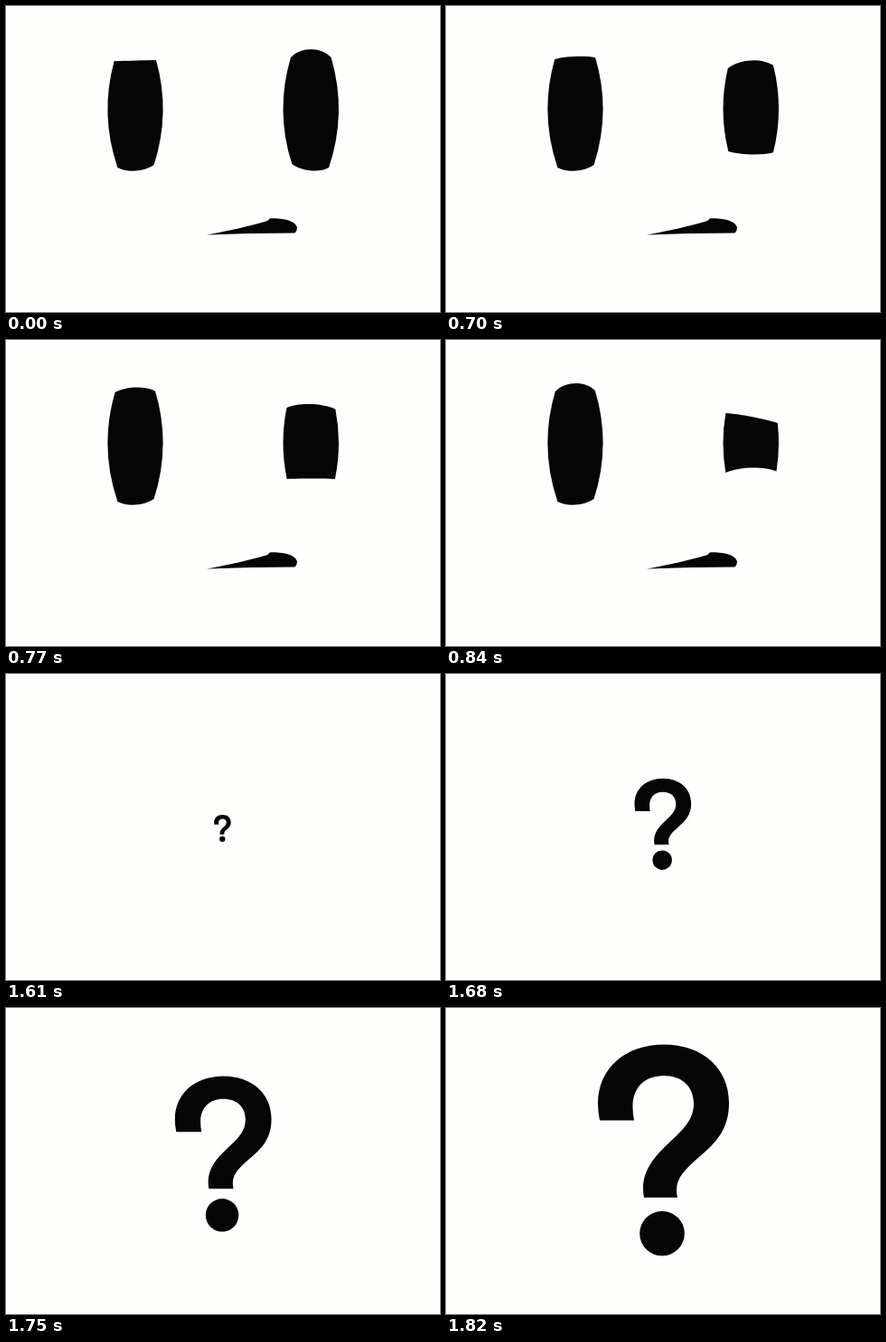
Write an HTML page that moves like this. It is 480 px wide and 339 px high and loops after 4340 ms.

```html
<!DOCTYPE html>
<html lang="en">
<head>
<meta charset="utf-8">
<title>Wink and question</title>
<style>
  html, body { margin: 0; width: 100%; height: 100%; overflow: hidden; background: #fefefc; }
  svg { display: block; width: 100%; height: 100%; }
</style>
</head>
<body>
<svg viewBox="0 0 480 339" fill="#050505">
  <g id="face">
    <path id="left"/>
    <path id="right"/>
    <path d="M222 253.6Q262 246 286 239Q290 238 292 235.2C305 235 320 237 322 245.500Q322 249 319.500 251.500Q270 251.600 222 253.600Z"/>
  </g>
  <g id="mark">
    <path d="M170 124.500Q168 115 168 106C168 67 198 40.500 241 40.500C284 40.500 313 67 313 105C313 134 299 149 280 165C264 179 255 188 255 202Q255 206 256 210H219Q218 205 218 200C218 180 230 165 246 150C262 135 274 124 274 106C274 87 261 75 241 75C219 75 206.500 89 206.500 109Q206.500 118 208 124.500Z"/>
    <circle cx="239" cy="249.800" r="24.800"/>
  </g>
</svg>
<script>
const LOOP = 4340, STEP = 70;
const WINK = 700, ASK = 1610;
const MID = 114, BEND = 0.0026;
const $ = id => document.getElementById(id);
const mix = (a, b, k) => a + (b - a) * k;

// A lid is an arc: left y, right y and rise above the chord.
// The right corner eases by its own power.
const lid = (from, to, power = 1) => k => ({
  l: mix(from[0], to[0], k),
  r: mix(from[1], to[1], k ** power),
  rise: mix(from[2], to[2], k * k)
});

const still = [179, 176, -5];
const eyes = [
  {
    el: $('left'), x0: 112.4, x1: 173.6,
    top: lid([61, 60, 0], [57, 56, 8.5], 0.5),
    bottom: lid(still, still)
  },
  {
    el: $('right'), x0: 306.5, x1: 368,
    top: lid([57, 57, 9], [81, 92, 1.5], 2),
    bottom: lid([175, 179, -5.3], [147, 145.5, 4.8])
  }
];

// Both sides of an eye are parabolas that curve inwards (dir 1 = left side).
const sideX = (x, dir, y) => x + dir * BEND * (y - MID) ** 2;
const side = (x, dir, a, b) =>
  `Q${x + dir * BEND * (a - MID) * (b - MID)} ${(a + b) / 2} ${sideX(x, dir, b)} ${b}`;

function arc(xa, ya, xb, yb, rise) {
  const handle = f => `${mix(xa, xb, f)} ${mix(ya, yb, f) - rise * 4 / 3}`;
  return `C${handle(0.25)} ${handle(0.75)} ${xb} ${yb}`;
}

function drawEye({ el, x0, x1, top, bottom }, k) {
  const t = top(k), b = bottom(k);
  const L = y => sideX(x0, 1, y), R = y => sideX(x1, -1, y);
  el.setAttribute('d',
    `M${L(t.l)} ${t.l}` +
    arc(L(t.l), t.l, R(t.r), t.r, t.rise) +
    side(x1, -1, t.r, b.r) +
    arc(R(b.r), b.r, L(b.l), b.l, b.rise) +
    side(x0, 1, b.l, t.l) + 'Z');
}

function render(ms) {
  const t = Math.floor((ms % LOOP) / STEP) * STEP;
  const asking = t >= ASK;
  $('face').style.display = asking ? 'none' : '';
  $('mark').style.display = asking ? '' : 'none';
  if (asking) {
    const s = Math.min(1, 0.128 + 0.304 * (t - ASK) / STEP);
    $('mark').setAttribute('transform',
      `translate(239.3 173) scale(${s}) translate(-239.3 -173)`);
  } else {
    const k = t < WINK ? 0 : Math.min(1, 0.5 + (t - WINK) / (4 * STEP));
    eyes.forEach(eye => drawEye(eye, k));
  }
}

const start = performance.now();
function tick() {
  render(performance.now() - start);
  requestAnimationFrame(tick);
}
tick();
</script>
</body>
</html>
```
